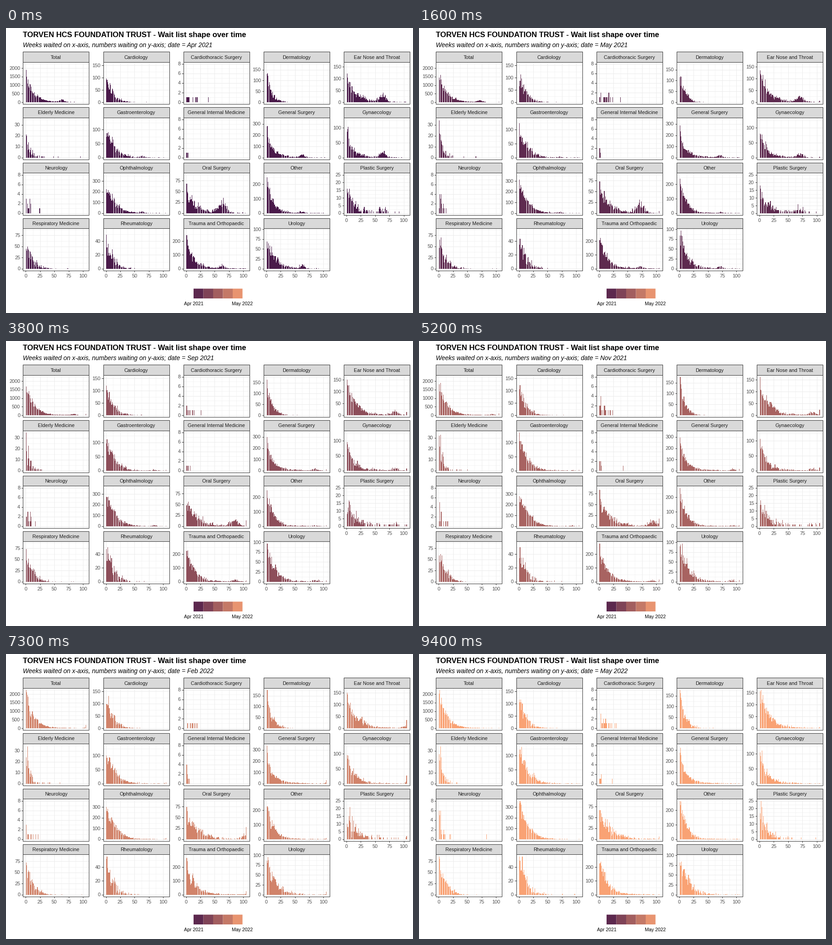
These frames come from a looping animation (894x626 px, 10000 ms). A matplotlib script:

```python
import matplotlib.pyplot as plt
import numpy as np
from matplotlib.animation import FuncAnimation
from matplotlib.collections import LineCollection, PolyCollection
from matplotlib.patches import Rectangle

WIDTH, HEIGHT, DPI = 894, 626, 100
PX = 72 / DPI
FRAMES, INTERVAL = 100, 100
MONTHS = [f"{name} 2021" for name in "Apr May Jun Jul Aug Sep Oct Nov Dec".split()]
MONTHS += [f"{name} 2022" for name in "Jan Feb Mar Apr May".split()]
LAST = len(MONTHS) - 1
WEEKS = np.arange(1, 106)
WEEKS_PER_MONTH = 4.35
DARK, LIGHT = np.array([74, 26, 74]) / 255, np.array([249, 162, 116]) / 255

LEFT, TOP = 37.4, 74.6
PANEL_W, PANEL_H, STRIP_H = 144.9, 92.6, 22.3
COL_STEP, ROW_STEP = 176.2, 121.9
WEEK_W = 1.256
# Both axes leave 5 % of the data range free at each end.
BAR_H = PANEL_H / 1.1
ZERO_X, ZERO_Y = 5.9, PANEL_H - BAR_H * 0.05

# title, highest count, tick step, starting level, share of recent arrivals,
# weeks until the queue thins out, long waits left from the backlog
PANELS = [
    ("Total", 2250, 500, 0.77, 0.33, 18, 0.06),
    ("Cardiology", 156, 50, 0.62, 0.2, 16, 0),
    ("Cardiothoracic Surgery", 8, 2, 0.13, 0, 13, 0),
    ("Dermatology", 177, 50, 0.8, 0.45, 14, 0),
    ("Ear Nose and Throat", 162.5, 50, 0.76, 0.3, 21, 0.16),
    ("Elderly Medicine", 35, 10, 0.72, 0.5, 10, 0),
    ("Gastroenterology", 137, 50, 0.74, 0.2, 19, 0.03),
    ("General Internal Medicine", 8, 2, 0.15, 1, 3, 0),
    ("General Surgery", 341, 100, 0.85, 0.6, 18, 0.07),
    ("Gynaecology", 128, 50, 0.72, 0.4, 15, 0.12),
    ("Neurology", 8, 2, 0.35, 0.2, 9, 0),
    ("Ophthalmology", 359, 100, 0.7, 0.15, 20, 0.03),
    ("Oral Surgery", 88, 25, 0.6, 0.2, 23, 0.25),
    ("Other", 266, 100, 0.8, 0.25, 15, 0.03),
    ("Plastic Surgery", 25, 5, 0.6, 0.3, 18, 0.1),
    ("Respiratory Medicine", 86, 25, 0.66, 0.25, 16, 0),
    ("Rheumatology", 55.5, 20, 0.65, 0.1, 16, 0),
    ("Trauma and Orthopaedic", 277, 100, 0.74, 0.3, 18, 0.07),
    ("Urology", 97, 25, 0.82, 0.2, 18, 0.06),
]


def waiting(month, seed, peak, level, recent, slow, backlog):
    """Patients per week waited: a decaying queue with a backlog drifting right."""
    tail = 0.01 + 0.55 * backlog ** 0.5
    shape = recent * np.exp(-(WEEKS - 1) / 3) + tail * np.exp(-WEEKS / 25)
    shape += max(0, 1 - recent - tail) * np.exp(-(WEEKS / slow) ** 1.5)
    rate = shape * min(1, level * (1 + 0.3 * month / LAST))

    arrival = WEEKS - WEEKS_PER_MONTH * month
    spread = 4 + 25 * backlog
    rate += backlog * np.exp(-month / 9 - ((arrival - 63) / spread) ** 2)
    for holiday in (17, -35):
        rate *= 1 - 0.4 * np.exp(-((arrival - holiday) / 1.1) ** 2)

    # Each arrival week keeps its own size while it ages.
    cohort = np.random.default_rng(seed).uniform(0.78, 1.2, 170)
    rate *= peak * cohort[np.round(arrival).astype(int) + 60]
    counts = np.random.default_rng(100 * seed + month).poisson(rate)
    counts[-1] += round(peak * backlog * np.interp(month, [0, 10, 13], [0, 1, 0.15]))
    return np.minimum(counts, peak)


plt.rcParams["font.family"] = "Liberation Sans"
fig = plt.figure(figsize=(WIDTH / DPI, HEIGHT / DPI), dpi=DPI, facecolor="white")
ax = fig.add_axes([0, 0, 1, 1])
ax.set(xlim=(0, WIDTH), ylim=(HEIGHT, 0))
ax.axis("off")


def label(x, y, text, size=10.9, color="#4d4d4d", ha="center", **style):
    return ax.text(x, y, text, fontsize=size * PX, color=color, ha=ha,
                   va="baseline", **style)


def box(x, y, w, h, fill, edge="none", z=1, **style):
    ax.add_patch(Rectangle((x, y), w, h, facecolor=fill, edgecolor=edge,
                           linewidth=PX, zorder=z, **style))


def place(index):
    row, col = divmod(index, 5)
    return LEFT + col * COL_STEP, TOP + row * ROW_STEP


def draw_panel(index, title, peak, step, major, minor, ticks):
    x, y = place(index)
    bottom = y + PANEL_H
    box(x, y - STRIP_H, PANEL_W, STRIP_H, "#d9d9d9", "#333333", 3)
    box(x, y, PANEL_W, PANEL_H, "none", "#333333", 4)
    label(x + PANEL_W / 2, y - 7.1, title, color="#1a1a1a", zorder=5)

    for value in np.arange(0, peak * 1.05, step / 2):
        line_y = y + ZERO_Y - value / peak * BAR_H / 1.0
        is_major = value % step == 0
        (major if is_major else minor).append([(x, line_y), (x + PANEL_W, line_y)])
        if is_major:
            ticks.append([(x - 3.4, line_y), (x, line_y)])
            label(x - 6.2, line_y + 3.6, f"{value:.0f}", ha="right")
    for week in np.arange(0, 101, 12.5):
        line_x = x + ZERO_X + week * WEEK_W
        is_major = week % 25 == 0
        (major if is_major else minor).append([(line_x, y), (line_x, bottom)])
        if is_major and index + 5 >= len(PANELS):
            ticks.append([(line_x, bottom), (line_x, bottom + 3.4)])
            label(line_x, bottom + 14.8, f"{week:.0f}")


def bar_corners(month):
    corners = []
    for index, (_, peak, _, *shape) in enumerate(PANELS):
        x, y = place(index)
        zero = y + ZERO_Y
        for week, count in zip(WEEKS, waiting(month, index + 11, peak, *shape)):
            if count:
                left = x + ZERO_X + (week - 0.45) * WEEK_W
                right = left + 0.9 * WEEK_W
                top = zero - count / peak * BAR_H
                corners.append([(left, zero), (left, top), (right, top), (right, zero)])
    return np.array(corners)


def shade(position):
    return DARK + (LIGHT - DARK) * position


major, minor, ticks = [], [], []
for number, (title, peak, step, *_) in enumerate(PANELS):
    draw_panel(number, title, peak, step, major, minor, ticks)
for lines, color, width in ((minor, "#ebebeb", 0.5), (major, "#ebebeb", 1),
                            (ticks, "#333333", 1)):
    ax.add_collection(LineCollection(lines, colors=color, linewidths=width * PX, zorder=1))

label(LEFT, 20.3, "TORVEN HCS FOUNDATION TRUST - Wait list shape over time",
      16.6, "black", "left", weight="bold")
subtitle = label(LEFT, 42, "", 13.7, "black", "left", style="italic")

for block in range(5):
    box(412 + 21.5 * block, 572.5, 21.5, 21.5, shade((block + 0.5) / 5), snap=False)
label(412, 609, MONTHS[0], 10.5, "black")
label(519.5, 609, MONTHS[-1], 10.5, "black")

BARS = [bar_corners(month) for month in range(LAST + 1)]
bars = PolyCollection(BARS[0], edgecolors="none", antialiaseds=False, zorder=2)
ax.add_collection(bars)


def month_at(frame):
    if frame < 16:
        return int(frame >= 8)
    return min(2 + (frame - 16) // 7, LAST)


def update(frame):
    # The heading follows one frame behind the bars.
    month, named = month_at(frame), month_at(frame - 1)
    bars.set_verts(BARS[month])
    bars.set_facecolor(shade((month + named) / 2 / LAST))
    subtitle.set_text("Weeks waited on x-axis, numbers waiting on y-axis; "
                      f"date = {MONTHS[named]}")
    return bars, subtitle


animation = FuncAnimation(fig, update, frames=FRAMES, interval=INTERVAL,
                          repeat=True, repeat_delay=0)
plt.show()
```
